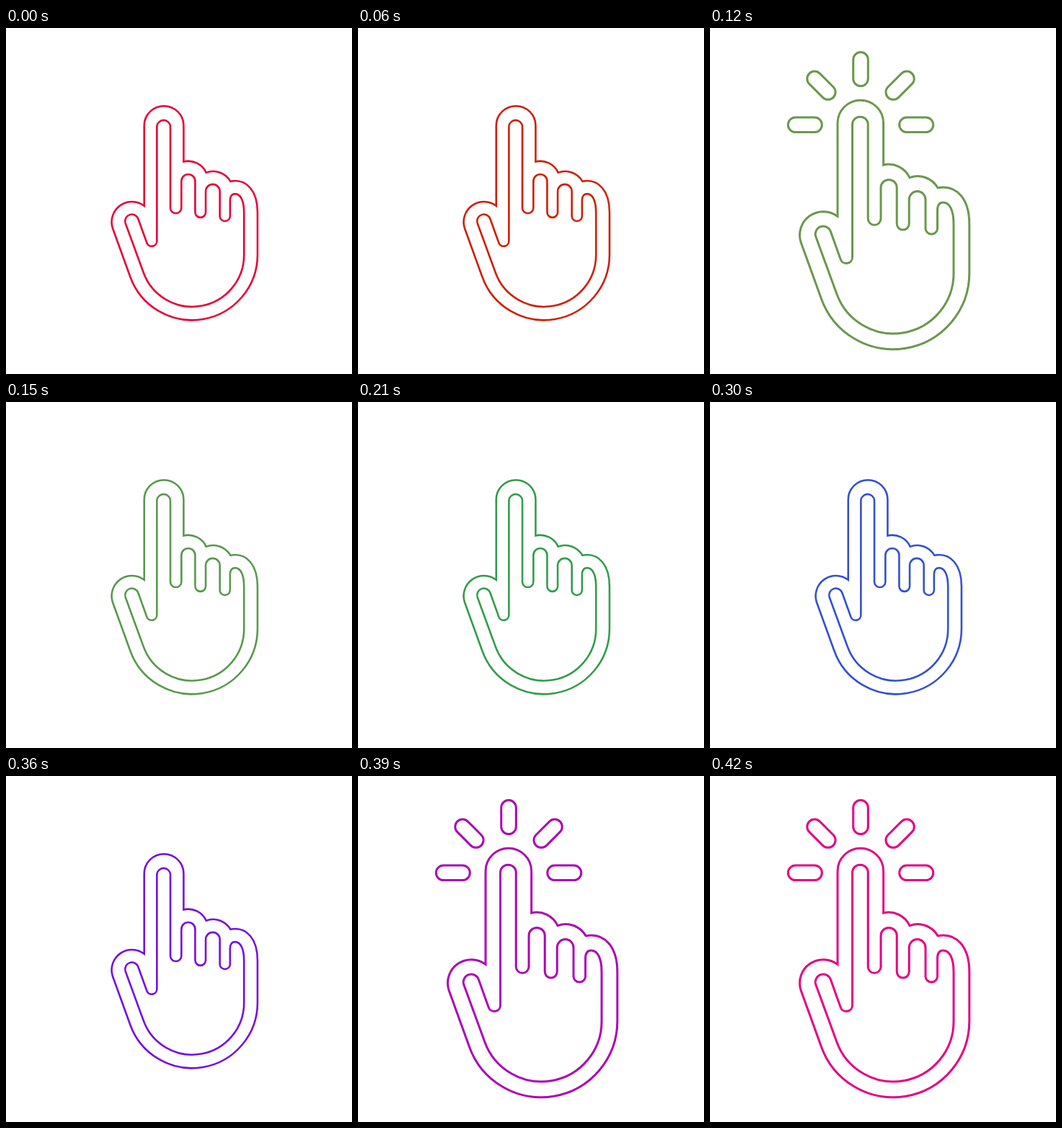
These frames come from a looping animation (480x480 px, 450 ms). An HTML page:

```html
<!DOCTYPE html>
<html lang="en">
<head>
<meta charset="utf-8">
<title>Tapping hand</title>
<style>
  html, body { margin: 0; width: 100%; height: 100%; overflow: hidden; background: #fff; }
  svg { display: block; width: 100%; height: 100%; }
  path, rect { fill: none; stroke-width: 3; }
</style>
</head>
<body>
<svg id="stage" viewBox="0 0 480 480">
  <g id="hand">
    <path d="M177 261.3V132A31.8 31.8 0 0 1 240.6 132V190A32 32 0 0 1 277 207.7
             A32 32 0 0 1 316 221.7C343 216.7 359.8 238 359.8 272V340
             A105.8 105.8 0 0 1 154.2 375L126 297.1A32.7 32.7 0 0 1 177 261.3Z"/>
    <path d="M338 340V272C338 252 332 242 323.5 242Q315.5 242 315.5 253V278.6
             A8.3 8.3 0 0 1 299 278.6V238A11.4 11.4 0 0 0 276.2 238V271.6
             A8.5 8.5 0 0 1 259.2 271.6V221.5A11.1 11.1 0 0 0 237 221.5V264.4
             A8.9 8.9 0 0 1 219.2 264.4V133A10.9 10.9 0 0 0 197.5 133V318
             A8.4 8.4 0 0 1 181.2 320.9L167.3 282.3A10.8 10.8 0 0 0 146.8 289.6L175.6 368.3
             A83.6 83.6 0 0 0 338 340Z"/>
  </g>
  <g id="rays"></g>
</svg>
<script>
  const LOOP = 450, STEP = 30, TAP_STEPS = 5;
  const stage = document.getElementById('stage');
  const hand = document.getElementById('hand');
  const rays = document.getElementById('rays');

  // Colour stops: [step, r, g, b]
  const stops = [
    [0, 232, 0, 52], [2, 208, 30, 4], [4, 106, 152, 76], [7, 50, 156, 76],
    [9, 18, 112, 200], [12, 116, 12, 228], [14, 228, 0, 132]
  ];

  for (let angle = -90; angle <= 90; angle += 45) {
    rays.innerHTML += `<rect x="198.7" y="33.6" width="20.6" height="47" rx="10.3"
      transform="rotate(${angle} 209 134.3)"/>`;
  }

  function colorAt(step) {
    const i = Math.max(1, stops.findIndex(s => s[0] >= step));
    const a = stops[i - 1], b = stops[i];
    const k = (step - a[0]) / (b[0] - a[0]);
    return `rgb(${[1, 2, 3].map(c => Math.round(a[c] + (b[c] - a[c]) * k))})`;
  }

  function draw(now) {
    const step = Math.floor(now % LOOP / STEP);
    const tapped = step % TAP_STEPS >= 3;
    stage.setAttribute('stroke', colorAt(step));
    hand.setAttribute('transform', tapped ? '' : 'translate(39.5 22) scale(.86)');
    rays.setAttribute('visibility', tapped ? 'visible' : 'hidden');
    requestAnimationFrame(time => draw(Math.max(0, time - start)));
  }

  const start = performance.now();
  draw(0);
</script>
</body>
</html>
```
